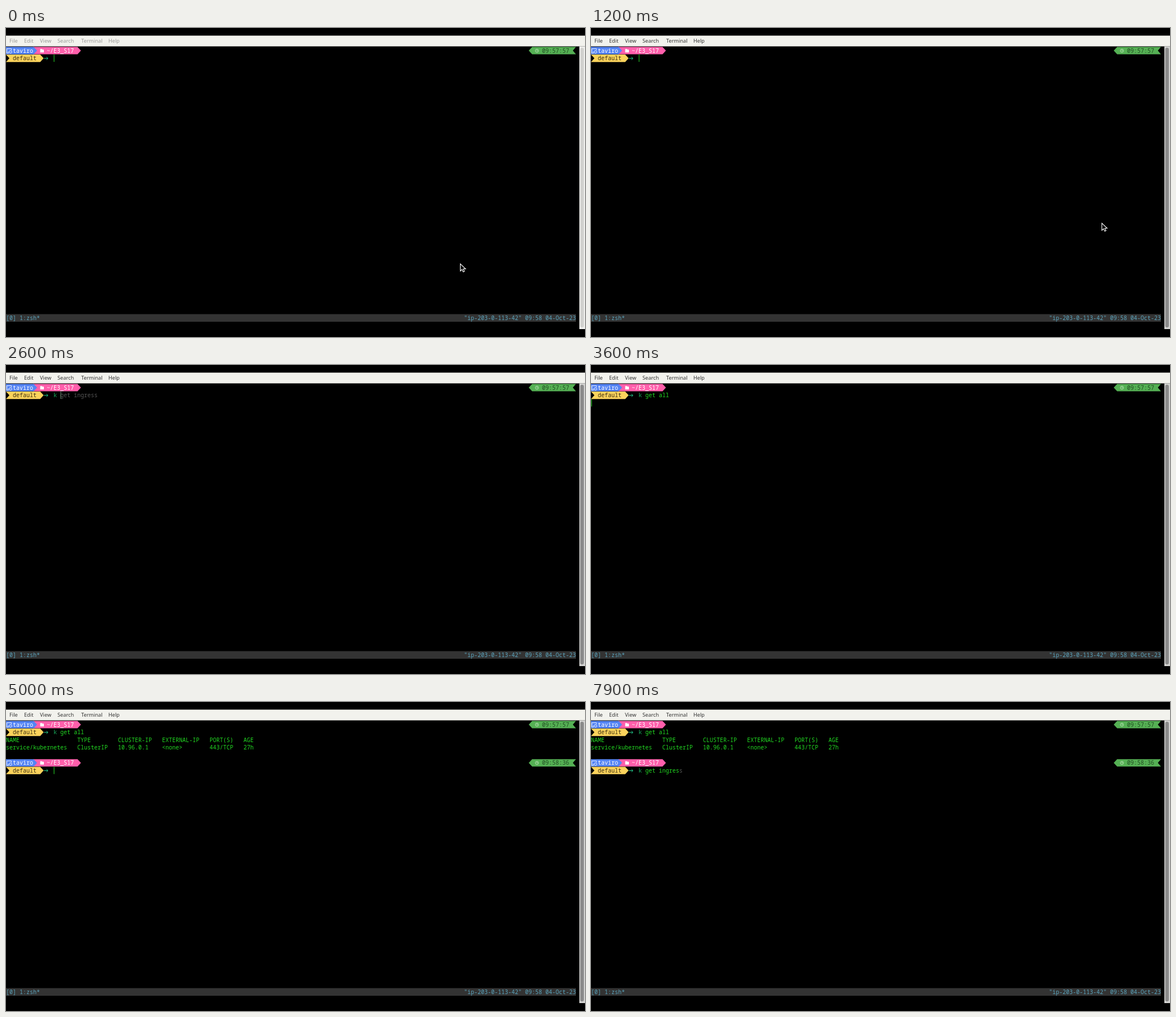
An HTML page for the animation above (8000 ms loop, 1024 px wide and 547 px high).

```html
<!DOCTYPE html>
<html lang="en">
<head>
<meta charset="utf-8">
<title>Terminal</title>
<style>
  html, body { margin: 0; width: 100%; height: 100%; overflow: hidden; background: #000; }
  svg { display: block; width: 1024px; height: 547px; }
  text { white-space: pre; }
  .mono { font: 10px "Noto Sans Mono", "DejaVu Sans Mono", monospace; fill: #22d822; }
  .menu { font: 9.2px "Noto Sans", "Open Sans", sans-serif; fill: #333;
          animation: menu 8s linear infinite; }
  .track { fill: #d3d3d1; animation: track 8s linear infinite; }
  .thumb { fill: #8b8b8b; animation: thumb 8s linear infinite; }
  @keyframes menu { 0%, 11.25% { fill: #9b9b99; } 13.75%, 100% { fill: #333; } }
  @keyframes track { 0%, 11.25% { fill: #f0f0ed; } 13.75%, 100% { fill: #d3d3d1; } }
  @keyframes thumb { 0%, 11.25% { fill: #d2d2cf; } 13.75%, 100% { fill: #8b8b8b; } }
</style>
</head>
<body>
<svg viewBox="0 0 1024 547">
  <rect width="1024" height="547"/>
  <rect y="13.5" width="1024" height="19" fill="#f2f2ed"/>
  <g class="menu">
    <text x="6" y="26.3">File</text>
    <text x="32" y="26.3">Edit</text>
    <text x="60" y="26.3">View</text>
    <text x="91" y="26.3">Search</text>
    <text x="133" y="26.3">Terminal</text>
    <text x="181" y="26.3">Help</text>
  </g>
  <rect class="track" x="1014" y="32.5" width="10" height="500.5"/>
  <rect class="thumb" x="1015.5" y="35" width="6.5" height="495" rx="3"/>
  <rect y="506.5" width="1008" height="13.5" fill="#333"/>
  <g id="screen" class="mono"></g>
  <rect id="caret" width="1.2" height="13" fill="#22b822"/>
  <path id="mouse" d="M0.5 0.5V13.2L3.5 10.4L5.6 14.7L7.8 13.7L5.8 9.5H9.8Z" fill="#000" stroke="#fff" stroke-width="1.1"/>
</svg>
<script>
const LOOP = 8000, CELL = 6, ROW = 13.53, TOP = 33.2;
const NS = "http://www.w3.org/2000/svg";
const $ = id => document.getElementById(id);
const screen = $("screen"), caret = $("caret"), mouse = $("mouse");

function add(parent, tag, attrs, content) {
  const el = document.createElementNS(NS, tag);
  for (const k in attrs) el.setAttribute(k, attrs[k]);
  if (content) el.textContent = content;
  return parent.appendChild(el);
}
const group = () => add(screen, "g", {});
const write = (g, col, row, str, fill) =>
  add(g, "text", { x: col * CELL, y: TOP + row * ROW + 10.4, ...(fill && { style: "fill:" + fill }) }, str);

function prompt(row, clock) {
  const g = group();
  const box = add(g, "g", { transform: `translate(0 ${TOP + row * ROW})` });
  const shape = (d, fill) => add(box, "path", { d, fill });
  const line = (d, stroke) => add(box, "path", { d, stroke, fill: "none" });
  shape("M48 .3H126.5L132.5 6.8L126.5 13.3H48Z", "#ff5fab");
  shape("M0 .3H49L55 6.8L49 13.3H0Z", "#5484f4");
  line("M1.5 3.5H9.5V6M1.5 3.5V11.5H5M3 9.5H5", "#e8efff");
  add(box, "circle", { cx: 8, cy: 9.2, r: 2.3, fill: "none", stroke: "#e8efff" });
  shape("M60.5 4H63.5L64.5 5H67V10H60.5Z", "#fff");
  shape("M0 13.8H60.5L66.5 20.4L60.5 27H0L6 20.4Z", "#fbd35c");
  shape("M930.5 .3H1008L1002.5 6.8L1008 13.3H930.5L924.5 6.8Z", "#55b054");
  add(box, "circle", { cx: 939, cy: 7, r: 2.8, fill: "none", stroke: "#b9e2b5", "stroke-width": .9 });
  line("M939 5.3V7H940.4", "#b9e2b5");
  line("M67 20.6H74M71.6 18.2L74.2 20.6L71.6 23", "#24cf91");
  write(g, 2, row, "taviro", "#fff");
  write(g, 12, row, "~/E3_S17", "#fff");
  write(g, 158, row, clock, "#214c22");
  write(g, 2, row + 1, "default", "#3c3010");
  return g;
}

function inputLine(row) {
  const g = group();
  return {
    row,
    cmd: write(g, 14, row, "", "#17a257"),
    args: write(g, 15, row, ""),
    ghost: write(g, 14, row, "", "#555")
  };
}

prompt(0, "09:57:57");
const output = group();
[[0, "NAME", "service/kubernetes"], [21, "TYPE", "ClusterIP"], [33, "CLUSTER-IP", "10.96.0.1"],
 [46, "EXTERNAL-IP", "<none>"], [60, "PORT(S)", "443/TCP"], [70, "AGE", "27h"]]
  .forEach(([col, head, value]) => {
    write(output, col, 2, head);
    write(output, col, 3, value);
  });
const prompt2 = prompt(5, "09:58:36");
const job = write(screen, 0, 35, "", "#5ba4bd");
write(screen, 135, 35, '"ip-203-0-113-42" 09:58 04-Oct-23', "#5ba4bd");

const first = inputLine(1), second = inputLine(6);
const keys1 = [2300, 2600, 2900, 3000, 3100, 3200, 3300, 3400, 3500];
const keys2 = [5700, 5800, 5900, 6100, 6200, 6400, 6600, 7000, 7300, 7400, 7600, 7800];
const ENTER = 3600, OUTPUT = 3800, READY = 4000;
const presses = [1000, ...keys1, ENTER, ...keys2];

function type(line, keys, typed, t, suggest) {
  const n = keys.filter(k => k <= t).length;
  line.cmd.textContent = n ? typed[0] : "";
  line.args.textContent = typed.slice(1, Math.max(1, n));
  line.ghost.textContent = n ? suggest(n).slice(n) : "";
  line.ghost.setAttribute("x", (14 + n) * CELL);
  return 14 + n;
}

// Pointer slows down along a smooth path through a few points.
const path = [[0, 803, 417], [600, 869, 381], [1200, 903, 345], [1600, 909, 338]];
function pointer(t) {
  let i = 0;
  while (i < path.length - 2 && t > path[i + 1][0]) i++;
  const [t0, x0, y0] = path[i], [t1, x1, y1] = path[i + 1];
  const p = Math.min(1, (t - t0) / (t1 - t0));
  return [x0 + (x1 - x0) * p, y0 + (y1 - y0) * p];
}

const show = (el, on) => el.setAttribute("visibility", on ? "visible" : "hidden");

function draw(t) {
  const col1 = type(first, keys1, "k get all", t, n => n < 7 ? "k get ingress" : "k get all");
  const col2 = type(second, keys2, "k get ingress", t, n => n < 7 ? "k get all" : "k get ingress");
  show(output, t >= OUTPUT);
  show(prompt2, t >= READY);
  job.textContent = t >= OUTPUT && t < 4800 ? "[0] 1:minikube*" : "[0] 1:zsh*";

  let col = col1, row = 1;
  if (t >= READY) { col = col2; row = 6; }
  else if (t >= OUTPUT) { col = 0; row = 4; }
  else if (t >= ENTER) { col = 0; row = 2; }
  caret.setAttribute("x", col * CELL + .4);
  caret.setAttribute("y", TOP + row * ROW + .2);
  caret.setAttribute("fill", t >= 2300 && t < ENTER || t >= 5700 ? "#66806a" : "#22b822");
  const last = presses.filter(k => k <= t).pop();
  show(caret, t < 7850 && (last === undefined || (t - last) % 1200 < 600));

  const [x, y] = pointer(Math.floor(t / 100) * 100);
  mouse.setAttribute("transform", `translate(${x} ${y})`);
  show(mouse, t < 2300);
}

const start = performance.now();
for (const a of document.getAnimations()) a.startTime = start;
function tick() {
  draw((performance.now() - start) % LOOP);
  requestAnimationFrame(tick);
}
tick();
</script>
</body>
</html>
```
